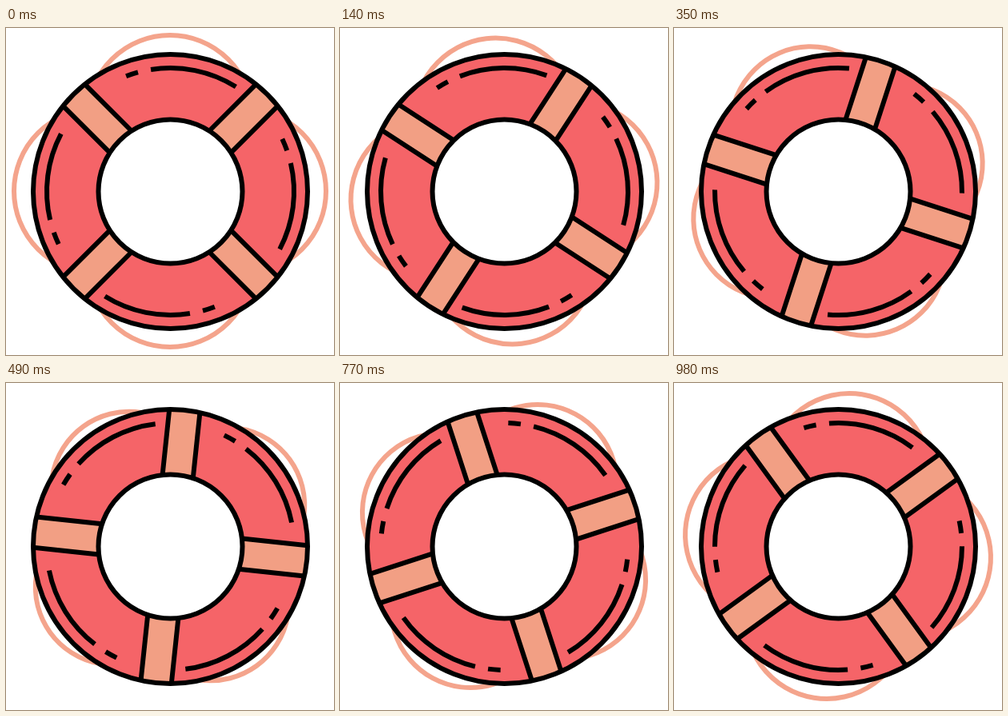
Recreate the animation shown at these times as an HTML page with a canvas. Size 410 px wide and 409 px high, loop 1.05 s.

```html
<!DOCTYPE html>
<html lang="en">
<head>
<meta charset="utf-8">
<title>Lifebuoy</title>
<style>
  html, body { margin: 0; width: 100%; height: 100%; overflow: hidden; background: #fff; }
  canvas { display: block; }
</style>
</head>
<body>
<canvas id="stage" width="410" height="409"></canvas>
<script>
const ctx = document.getElementById('stage').getContext('2d');
const CX = 205.5, CY = 204.5;
const STEP = 70, STEPS = 15;
const RED = '#f56468', PEACH = '#f29f84', ROPE = '#f4a48c';
const OUTER = 171.5, INNER = 90, GLOSS = 154.5;
const rad = deg => deg * Math.PI / 180;

function disc(x, y, r, fill, stroke) {
  ctx.beginPath();
  ctx.arc(x, y, r, 0, Math.PI * 2);
  if (fill) { ctx.fillStyle = fill; ctx.fill(); }
  if (stroke) { ctx.strokeStyle = stroke; ctx.stroke(); }
}

// Angles run clockwise from straight up.
function gloss(from, to) {
  ctx.beginPath();
  ctx.arc(0, 0, GLOSS, rad(from - 90), rad(to - 90));
  ctx.stroke();
}

function strap() {
  const w = 19.2;
  const reach = r => -Math.sqrt(r * r - w * w);
  ctx.fillStyle = PEACH;
  ctx.fillRect(-w, -OUTER, w * 2, OUTER - INNER + 2);
  ctx.beginPath();
  for (const x of [-w, w]) {
    ctx.moveTo(x, reach(OUTER));
    ctx.lineTo(x, reach(INNER));
  }
  ctx.stroke();
}

function quarters(start, draw) {
  for (let q = 0; q < 4; q++) {
    ctx.save();
    ctx.rotate(rad(start + q * 90));
    draw(q);
    ctx.restore();
  }
}

function render(i) {
  const turn = 6 * i - (i > 3 ? 3 : 0);
  const lag = Math.min(2.7 * i, 6.3 - 0.45 * i);
  const squeeze = 1 - 0.06 * (1 - Math.abs(i - 8) / 8);

  ctx.setTransform(1, 0, 0, 1, 0, 0);
  ctx.fillStyle = '#fff';
  ctx.fillRect(0, 0, 410, 409);
  ctx.translate(CX, CY);
  ctx.lineWidth = 6;

  // Rope loops behind the ring
  ctx.save();
  ctx.translate(-0.5, -0.5);
  quarters(lag - turn, () =>
    disc(0, -92 * squeeze, 103 * squeeze, null, ROPE));
  ctx.restore();

  disc(0, 0, OUTER, RED);

  ctx.save();
  ctx.beginPath();
  ctx.arc(0, 0, OUTER, 0, Math.PI * 2);
  ctx.clip();
  ctx.strokeStyle = '#000';
  quarters(45 - turn, strap);
  ctx.restore();

  ctx.strokeStyle = '#000';
  quarters(-turn, q => {
    const shift = q % 2 ? -4.2 : 0;
    gloss(shift - 21, shift - 15.2);
    gloss(shift - 9.1, shift + 32);
  });

  disc(0, 0, OUTER, null, '#000');
  disc(0, 0, INNER, '#fff', '#000');
}

function tick() {
  render(Math.floor(performance.now() / STEP) % STEPS);
  requestAnimationFrame(tick);
}
tick();
</script>
</body>
</html>
```
